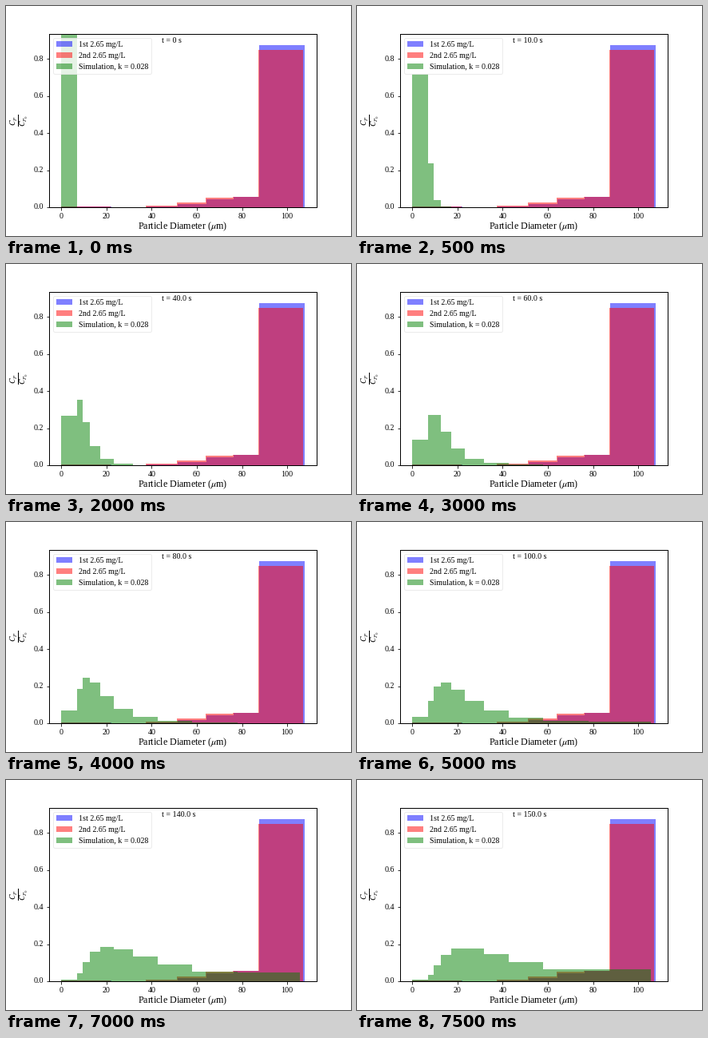
These frames come from a looping animation (432 by 288 pixels, 8000 ms). A matplotlib script:

```python
import math

import numpy as np
import matplotlib.pyplot as plt
from matplotlib.animation import FuncAnimation

plt.rcParams.update({
    "font.family": "Liberation Serif",
    "font.size": 10,
    "mathtext.fontset": "stix",
    "axes.linewidth": 1,
    "ytick.alignment": "center",
    "legend.edgecolor": "0.9",
    "figure.subplot.bottom": 0.125,
})

FRAMES = 16
STEP_S = 10               # simulated seconds per frame
RATE = 0.03319            # collisions per second
BINS = 10
GROWTH = 2 ** (1 / 2.3)   # diameter ratio when the mass doubles
LARGEST = 107.6           # micrometres


def shares(t):
    """Share of mass per size class; the last class collects the rest."""
    m = RATE * t
    p = [math.exp(-m) * m ** i / math.factorial(i) for i in range(BINS - 1)]
    return p + [1 - sum(p)]


def draw_bars(edges, heights, color, label):
    return ax.bar(edges[:-1], heights, np.diff(edges), align="edge",
                  color=color, alpha=0.5, linewidth=0, label=label)


def draw_sample(color, label, largest, coarse, mode, decay):
    """Measured sample: few fines, a bell of mid sizes, mostly coarse."""
    k = np.arange(7)
    edges = np.append(largest * (k / 7.84) ** (1 / 1.3), largest)
    heights = 0.057 * np.exp(-decay * (k - mode) ** 2)
    heights[0], heights[-1] = 0.003, coarse
    draw_bars(edges, heights, color, label)


fig, ax = plt.subplots(figsize=(6, 4), dpi=72)

draw_sample("blue", "1st 2.65 mg/L", LARGEST, 0.873, 5, 0.282)
draw_sample("red", "2nd 2.65 mg/L", 107.1, 0.848, 4.73, 0.256)
sim_edges = np.append(0, 7.01 * GROWTH ** np.arange(BINS))
sim = draw_bars(sim_edges, shares(0), "green", "Simulation, k = 0.028")

ax.set_xlim(-0.05 * LARGEST, 1.05 * LARGEST)
ax.set_ylim(0, 0.937)
ax.set_xlabel(r"Particle Diameter ($\mu$m)", fontsize=12, labelpad=1)
ax.set_ylabel(r"$\frac{C_P}{C_{P_0}}$", fontsize=14, labelpad=5)
ax.legend(loc="upper left")
clock = ax.text(0.42, 0.947, "", transform=ax.transAxes)


def update(i):
    t = i * STEP_S
    for bar, h in zip(sim, shares(t)):
        bar.set_height(h)
    clock.set_text(f"t = {float(t)} s" if t else "t = 0 s")
    return [*sim, clock]


anim = FuncAnimation(fig, update, frames=FRAMES, interval=500,
                     repeat=True, repeat_delay=0)
plt.show()
```
